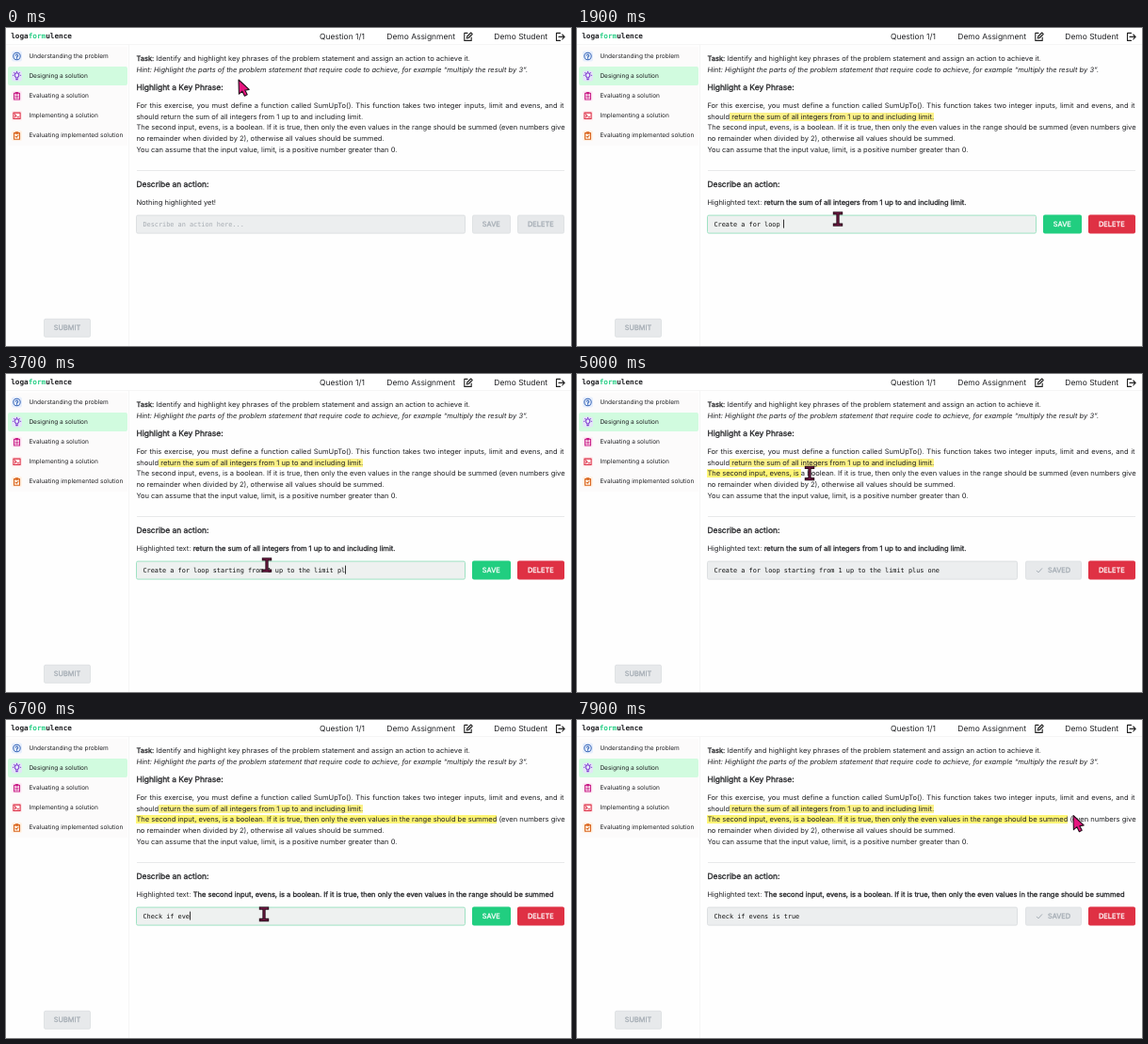
These frames come from a looping animation (600 px wide and 338 px high, 8 s). An HTML page:

```html
<!DOCTYPE html>
<html lang="en">
<head>
<meta charset="utf-8">
<title>Designing a solution</title>
<style>
html, body { margin: 0; width: 100%; height: 100%; overflow: hidden; background: #fff; }
#stage {
  position: relative; width: 600px; height: 338px; overflow: hidden; background: #fefefe;
  font: 7.53px/12px Inter, sans-serif; color: #202124;
  text-rendering: geometricPrecision; white-space: nowrap;
}
#stage > * { position: absolute; }
/* --y is the middle of the capitals */
.t { left: var(--x, 138.4px); top: calc(var(--y) - 6px); }
.head { font-size: 8.45px; }
.side { --x: 24.4px; font-size: 6.54px; }
b, .bold { font-weight: 400; -webkit-text-stroke: .28px currentColor; }
.mono { font-family: "DejaVu Sans Mono", monospace; font-size: 6.87px; white-space: pre; color: #111; }
.logo { font: bold 7.7px/12px "DejaVu Sans Mono", monospace; }
.logo span { color: #27cf86; }
header { left: 0; top: 0; width: 600px; height: 17px; background: #fff; border-bottom: .5px solid #f6f6f6; }
aside { left: 0; top: 17px; width: 130px; height: 321px; border-right: .7px solid #f5f5f5; }
.rows { left: 2px; top: 20px; width: 127px; height: 105px; background: #fcfbfb; }
.sel { left: 2px; top: 41px; width: 127px; height: 20px; border-radius: 2px; background: #d1fbdf; }
.rule { left: 138.5px; top: 151.4px; width: 454px; height: .8px; background: #e8e9ea; }
#para { left: 138.4px; top: 77.1px; width: 454.2px; line-height: 11.65px; }
#para .full { text-align-last: justify; }
mark { background: #fbf188; color: inherit; }
#on2 { background: #fef576; }
#field, .btn { top: 0; height: 20px; box-sizing: border-box; border-radius: 2px; transform: translateY(198.6px); }
#field {
  left: 138.4px; width: 349.6px;
  padding: 0 6px; line-height: 19px; border: .6px solid #dcdfe1; background: #eceeef;
}
#field.focus { border-color: #9fe2c3; background: #eef1f0; }
#field.saved { width: 330px; }
#caret { display: inline-block; width: .8px; height: 9px; margin: 0 -.5px 0 -.3px; background: #333; vertical-align: -2px; }
.hint { color: #a6acb2; }
.btn { display: flex; align-items: center; justify-content: center; color: #fff; font-size: 7.42px; }
.btn.off { background: #e7e9eb !important; color: #a3abb3; border: .5px solid #dfe2e4; }
#save { left: 495px; width: 40.6px; background: #21ce80; }
#save.saved { left: 475.5px; width: 60.1px; }
#save svg { width: 8px; height: 8px; margin-right: 5px; display: none; }
#save.saved svg { display: block; }
#del { left: 543px; width: 49.6px; background: #df3144; }
#submit { left: 40px; width: 50px; transform: translateY(308.8px); }
#art { left: 0; top: 0; fill: none; stroke-linecap: round; stroke-linejoin: round; }
</style>
</head>
<body>
<div id="stage">
  <header></header>
  <aside></aside>
  <div class="rows"></div>
  <div class="sel"></div>

  <div class="t logo" style="--x:5.2px;--y:9px">loga<span>form</span>ulence</div>
  <div class="t head" style="--x:333px;--y:10px">Question 1/1</div>
  <div class="t head" style="--x:404.3px;--y:10px">Demo Assignment</div>
  <div class="t head" style="--x:518.3px;--y:10px">Demo Student</div>

  <div class="t side" style="--y:30px">Understanding the problem</div>
  <div class="t side" style="--y:51px">Designing a solution</div>
  <div class="t side" style="--y:72px">Evaluating a solution</div>
  <div class="t side" style="--y:93.3px">Implementing a solution</div>
  <div class="t side" style="--y:114.4px">Evaluating implemented solution</div>

  <div class="t" style="--y:33px"><b>Task:</b> Identify and highlight key phrases of the problem statement and assign an action to achieve it.</div>
  <div class="t" style="--y:44.6px"><i>Hint: Highlight the parts of the problem statement that require code to achieve, for example “multiply the result by 3”.</i></div>
  <div class="t head bold" style="--y:64px">Highlight a Key Phrase:</div>
  <div id="para">
    <div class="full">For this exercise, you must define a function called SumUpTo(). This function takes two integer inputs, limit and evens, and it</div>
    <div>should<mark id="on1"></mark><span id="off1"></span></div>
    <div class="full"><mark id="on2"></mark><span id="off2"></span> (even numbers give</div>
    <div>no remainder when divided by 2), otherwise all values should be summed.</div>
    <div>You can assume that the input value, limit, is a positive number greater than 0.</div>
  </div>
  <div class="rule"></div>
  <div class="t head bold" style="--y:167px">Describe an action:</div>
  <div class="t" style="--y:186.4px"><span id="label"></span><b id="phrase"></b></div>

  <div id="field" class="mono"><span id="typed"></span><span id="caret"></span></div>
  <div id="save" class="btn bold"><svg viewBox="0 0 8 8" fill="none" stroke="currentColor"><path d="M1 4.3 3 6.3 7 1.8"/></svg><span id="saveText"></span></div>
  <div id="del" class="btn bold">DELETE</div>
  <div id="submit" class="btn bold off">SUBMIT</div>

  <svg id="art" width="600" height="338">
    <g stroke="#222" stroke-width="1.1" transform="translate(0 .4)">
      <path d="M490 5h-3.2v8h7.4v-3.4M489.3 10.6l.4-2 4-4 1.5 1.5-4 4z"/>
      <path d="M588.5 5h-4v8h4M587 9h6M590.8 6.6 593.2 9l-2.4 2.4"/>
    </g>
    <g stroke="none">
      <rect x="6" y="24.5" width="11" height="11" rx="2" fill="#e6eefc"/>
      <rect x="6" y="45.5" width="11" height="11" rx="2" fill="#e3e4f8"/>
      <rect x="6" y="66.7" width="11" height="11" rx="2" fill="#fdebf5"/>
      <rect x="6" y="87.8" width="11" height="11" rx="2" fill="#feecee"/>
      <rect x="6" y="109" width="11" height="11" rx="2" fill="#fff0e2"/>
    </g>
    <g stroke-width="1.05">
      <g stroke="#3a68b8"><circle cx="11.5" cy="30" r="3.7"/><path d="M10.3 29.1a1.2 1.2 0 1 1 1.2 1.5v.4M11.5 32.1v.1"/></g>
      <path stroke="#7a35cc" d="M10.4 53v-.9a2.3 2.3 0 1 1 2.2 0v.9zM10.7 54.6h1.6M11.5 46.3v.2M7.4 50.3h.2M15.4 50.3h.2M8.6 47.5l.2.2M14.4 47.5l-.2.2"/>
      <path stroke="#c92088" d="M8.5 69.3h6v6.6h-6zM10.2 68.4h2.6v1.5h-2.6zM10 72.2h3M10 74h3"/>
      <path stroke="#dc2a42" d="M7.9 90.1h7.2v6.4H7.9zM9.4 91.9l1.4 1.4-1.4 1.4M11.9 94.8h1.7"/>
      <path stroke="#d9631c" d="M8.5 111.6h6v6.6h-6zM10.2 110.7h2.6v1.5h-2.6zM10 115.1l1.1 1.1 2-2.2"/>
    </g>
    <path id="arrow" d="M0 0 .4 15.2 3.9 12.2 6.4 17.2 9.2 15.8 6.8 11.1 11.2 10.4Z" fill="#e6147f" stroke="#26101c" stroke-width="1.1"/>
    <g id="beam" stroke-linecap="butt">
      <path d="M-5.2-6.2H5.2M-5.2 6.2H5.2M0-6V6" stroke="#2a0f1c" stroke-width="3.3"/>
      <path d="M-4.2-6.2H4.2M-4.2 6.2H4.2M0-6V6" stroke="#7c1848" stroke-width="1.1"/>
    </g>
  </svg>
</div>
<script>
const LOOP = 8000, STEP = 100;
const $ = id => document.getElementById(id);

const phrases = [
  "return the sum of all integers from 1 up to and including limit.",
  "The second input, evens, is a boolean. If it is true, then only the even values in the range should be summed"
];
const marked = [" " + phrases[0], phrases[1]];
const actions = ["Create a for loop starting from 1 up to the limit plus one", "Check if evens is true"];

// Keys are [time, value, ...]
const drag = [
  [[300, 0], [800, marked[0].length]],
  [[4800, 0], [5000, 28], [5600, marked[1].length]]
];
const typing = [
  [[1050, 0], [1900, 18], [3700, 52], [4000, 58]],
  [[6050, 0], [6700, 12], [7250, 22]]
];
const mouse = [
  [0, 247, 55], [300, 163, 94], [800, 378, 95], [1000, 277, 203], [4100, 277, 203],
  [4300, 515, 209], [4500, 515, 209], [4800, 139, 106], [5000, 247, 105.5], [5600, 521, 106.5],
  [5700, 521, 106.5], [5950, 274, 206.3], [7250, 274, 206.3], [7450, 515, 209], [7550, 515, 209], [7900, 527, 101.5]
];
const beamTimes = [[300, 4200], [4700, 7350]];
const edits = [
  { from: 900, focus: 1000, saved: 4400 },
  { from: 5700, focus: 5950, saved: 7500 }
];

function at(keys, t, col = 1) {
  const i = keys.findIndex(k => k[0] > t);
  if (i === 0) return keys[0][col];
  if (i < 0) return keys[keys.length - 1][col];
  const a = keys[i - 1], b = keys[i];
  return a[col] + (b[col] - a[col]) * (t - a[0]) / (b[0] - a[0]);
}

function draw(t) {
  marked.forEach((text, i) => {
    const n = Math.round(at(drag[i], t));
    $("on" + (i + 1)).textContent = text.slice(0, n);
    $("off" + (i + 1)).textContent = text.slice(n);
  });

  const n = t >= edits[1].from ? 1 : t >= edits[0].from ? 0 : -1;
  const edit = edits[n];
  const saved = !!edit && t >= edit.saved;
  const focus = !!edit && !saved && t >= edit.focus;
  const text = edit ? actions[n].slice(0, Math.floor(at(typing[n], t) + 1e-6)) : "";

  $("label").textContent = edit ? "Highlighted text: " : "Nothing highlighted yet!";
  $("phrase").textContent = edit ? phrases[n] : "";
  $("typed").textContent = text || (focus ? "" : "Describe an action here...");
  $("typed").classList.toggle("hint", !text);
  $("caret").style.display = focus ? "" : "none";
  $("field").classList.toggle("focus", focus);
  $("field").classList.toggle("saved", saved);
  $("save").classList.toggle("saved", saved);
  $("save").classList.toggle("off", !edit || saved);
  $("saveText").textContent = saved ? "SAVED" : "SAVE";
  $("del").classList.toggle("off", !edit);

  const place = `translate(${at(mouse, t, 1)} ${at(mouse, t, 2)})`;
  const beam = beamTimes.some(([a, b]) => t >= a && t < b);
  for (const id of ["arrow", "beam"]) {
    $(id).setAttribute("transform", place);
    $(id).style.display = (id === "beam") === beam ? "" : "none";
  }
}

const start = performance.now();
function tick() {
  const t = (performance.now() - start) % LOOP;
  draw(Math.floor(t / STEP) * STEP);
  requestAnimationFrame(tick);
}
tick();
</script>
</body>
</html>
```
